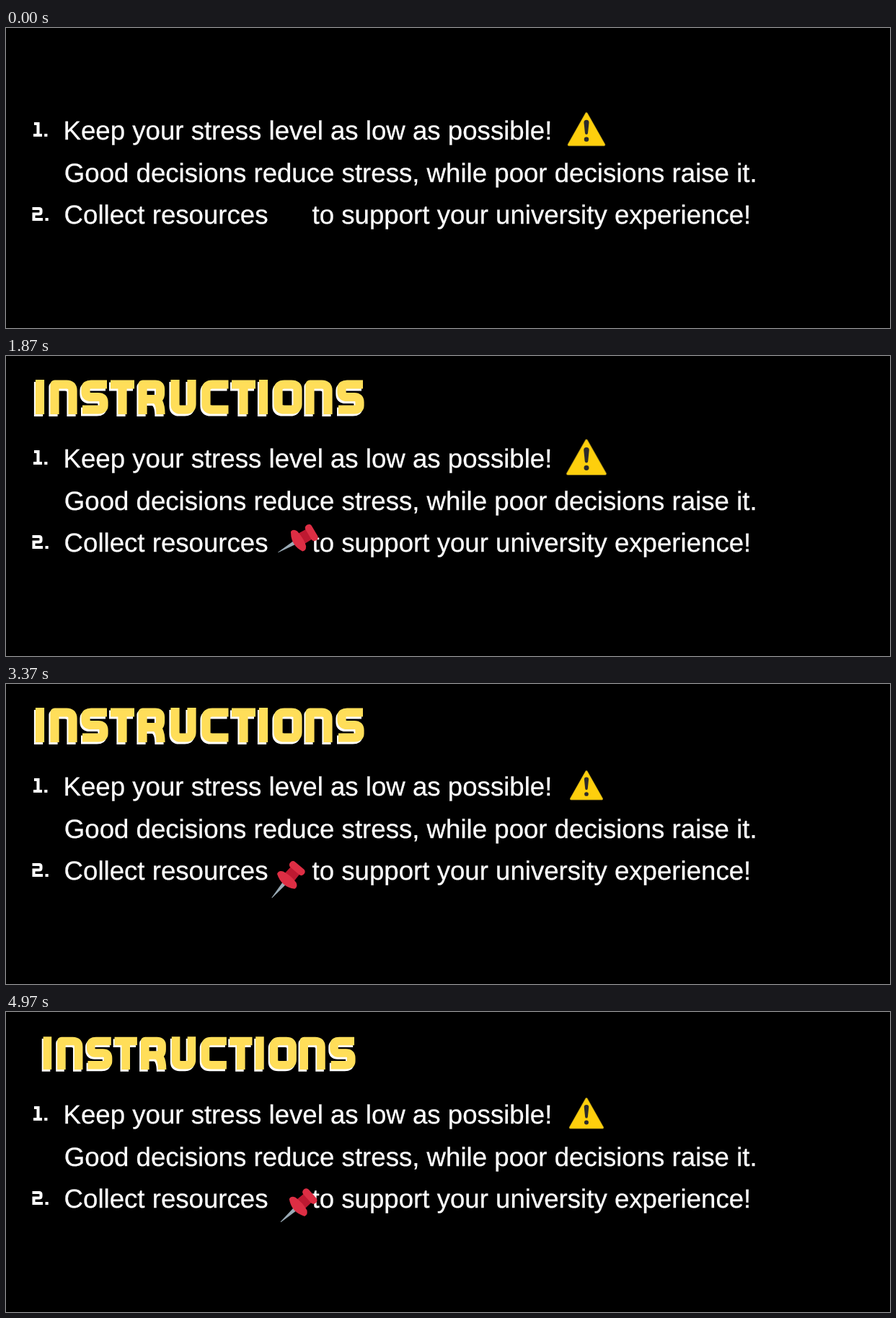
Animation of 1226 by 417 pixels, one loop 5010 ms. Source, as an HTML page:

```html
<!DOCTYPE html>
<html lang="en">
<head>
<meta charset="utf-8">
<title>Instructions</title>
<style>
  html, body { margin: 0; width: 100%; height: 100%; overflow: hidden; background: #000; }
  svg { display: block; width: 100%; height: 100%; }
  text {
    font: 36.63px "Liberation Sans", Arial, sans-serif;
    fill: #fff;
    stroke: #fff;
    stroke-width: 0.3;
    white-space: pre;
    text-rendering: geometricPrecision;
  }
  #title path { fill: none; stroke-width: 12.2; stroke-linejoin: round; }
  #markers { fill: none; stroke: #fff; stroke-width: 4.1; }
</style>
</head>
<body>
<svg viewBox="0 0 1226 417" preserveAspectRatio="none">
  <g id="title" role="img" aria-label="INSTRUCTIONS"></g>

  <text x="79.5" y="155">Keep your stress level as low as possible!</text>
  <text x="80.8" y="213.5">Good decisions reduce stress, while poor decisions raise it.</text>
  <text x="80.6" y="272">Collect resources      to support your university experience!</text>

  <g id="markers" role="img" aria-label="1. 2.">
    <path d="M39 133H44.5V149M38 149H50M53.2 149H57.4"/>
    <path d="M36.5 251H46Q48.5 251 48.5 253.5V256Q48.5 258.5 46 258.5H38.5V266H51M54.5 266H58.7"/>
  </g>

  <g id="warning">
    <path d="M0-21.5L24 21H-24Z" fill="#8a7418" stroke="#8a7418" stroke-width="4" stroke-linejoin="round"/>
    <path d="M0-21.5L24 21H-24Z" fill="#fecf0d" stroke="#fecf0d" stroke-width="2.6" stroke-linejoin="round"/>
    <path d="M-3.5-9.5Q-3.5-13 0-13T3.5-9.5L2 5Q1.8 7 0 7T-2 5Z" fill="#2b2a2c"/>
    <circle cy="13.5" r="3.2" fill="#2b2a2c"/>
  </g>

  <!-- the tip is near the origin, the head points along +x -->
  <g id="pin">
    <path d="M-2-0.4L27-3V3L-2 0.4Z" fill="#99aab5"/>
    <path d="M33-8.5L50-8V8L33 8.5Z" fill="#be1931"/>
    <path d="M28-16Q33-18 36-12Q39 0 36 12Q33 18 28 16Q23 8 23 0T28-16Z" fill="#dd2e44"/>
    <path d="M37-8L49-7.5V2L38 1Z" fill="#be1931"/>
    <rect x="47" y="-12.5" width="10" height="25" rx="4.5" fill="#dd2e44"/>
  </g>
</svg>
<script>
const LOOP = 5010;
const byId = id => document.getElementById(id);
const clamp = (v, lo = 0, hi = 1) => Math.min(hi, Math.max(lo, v));

// Heavy stroked letters, 48 units high
const glyphs = {
  I: [12, 'M6 0V48'],
  N: [38, 'M6.5 48V6.5H23Q31.5 6.5 31.5 15V48'],
  S: [38, 'M36 6.5H14Q6.5 6.5 6.5 12V17Q6.5 24 14 24H24Q31.5 24 31.5 31V36Q31.5 41.5 24 41.5H2'],
  T: [35, 'M1 6.5H34M17.5 6V48'],
  R: [38, 'M6.5 48V6.5H24Q31 6.5 31 13V19Q31 27 24 27H7M22 27Q31.5 28 31.5 48'],
  U: [36, 'M6.5 0V34Q6.5 41.5 14 41.5H22Q29.5 41.5 29.5 34V0'],
  C: [39, 'M37.5 6.5H15Q6.5 6.5 6.5 14V34Q6.5 41.5 15 41.5H37.5'],
  O: [40, 'M15 6.5H25Q33.5 6.5 33.5 14V34Q33.5 41.5 25 41.5H15Q6.5 41.5 6.5 34V14Q6.5 6.5 15 6.5Z']
};
const letterX = [41, 61, 104, 144, 183, 228, 271, 312, 351, 371, 415, 459];

function addPath(parent, d, stroke) {
  const path = document.createElementNS('http://www.w3.org/2000/svg', 'path');
  path.setAttribute('d', d);
  path.setAttribute('stroke', stroke);
  parent.append(path);
  return path;
}

const letters = [...'INSTRUCTIONS'].map((char, i) => {
  const [width, d] = glyphs[char];
  const group = document.createElementNS('http://www.w3.org/2000/svg', 'g');
  const shadow = addPath(group, d, '#fff');
  addPath(group, d, '#ffde59');
  byId('title').append(group);
  return { group, shadow, x: letterX[i], width, start: 200 + 100 * i };
});

// Pin drift: time, tip x, tip y, lean in degrees
const pinKeys = [
  [700, 377, 306, 48], [1070, 382, 291, 40], [1230, 383, 287, 37],
  [1600, 382, 283, 33], [1870, 379, 272, 30.5], [2300, 372, 267, 38],
  [2730, 366, 273, 48], [3270, 370, 297, 51], [3730, 370, 289, 42],
  [4430, 368, 281, 30.5], [4800, 379, 294, 39], [5010, 383, 290, 42]
];

function pinPose(t) {
  const i = Math.max(1, pinKeys.findIndex(key => key[0] >= t));
  const a = pinKeys[i - 1], b = pinKeys[i];
  const p = clamp((t - a[0]) / (b[0] - a[0]));
  const eased = (p + (1 - Math.cos(Math.PI * p)) / 2) / 2;
  return a.map((v, k) => v + (b[k] - v) * eased);
}

function drawTitle(t) {
  const phase = (t - 265 + 1500) % 1500;
  const scale = 1.053 - 0.0005 * Math.min(phase, 1500 - phase);
  byId('title').setAttribute('transform',
    `translate(255.7 58.5) scale(${scale}) translate(-255.7 -58.5)`);
  for (const { group, shadow, x, width, start } of letters) {
    const age = t - start;
    const pop = clamp(age / 100);
    const drop = clamp((age - 230) / 130);
    group.setAttribute('display', pop > 0 ? 'inline' : 'none');
    group.setAttribute('transform',
      `translate(${x + width / 2} 57) scale(${pop}) translate(${-width / 2} -24)`);
    shadow.setAttribute('transform', `translate(${-2 * drop} ${3 * drop})`);
  }
}

function draw(t) {
  drawTitle(t);

  const warningWidth = 62 - 16 * Math.abs(Math.sin(Math.PI * (t - 180) / 900));
  byId('warning').setAttribute('transform',
    `translate(805 141) scale(${warningWidth / 52})`);

  const [, x, y, lean] = pinPose(t);
  byId('pin').setAttribute('display', t >= 700 ? 'inline' : 'none');
  byId('pin').setAttribute('transform', `translate(${x} ${y}) rotate(${-lean})`);
}

const began = performance.now();
function tick() {
  draw((performance.now() - began) % LOOP);
  requestAnimationFrame(tick);
}
tick();
</script>
</body>
</html>
```
